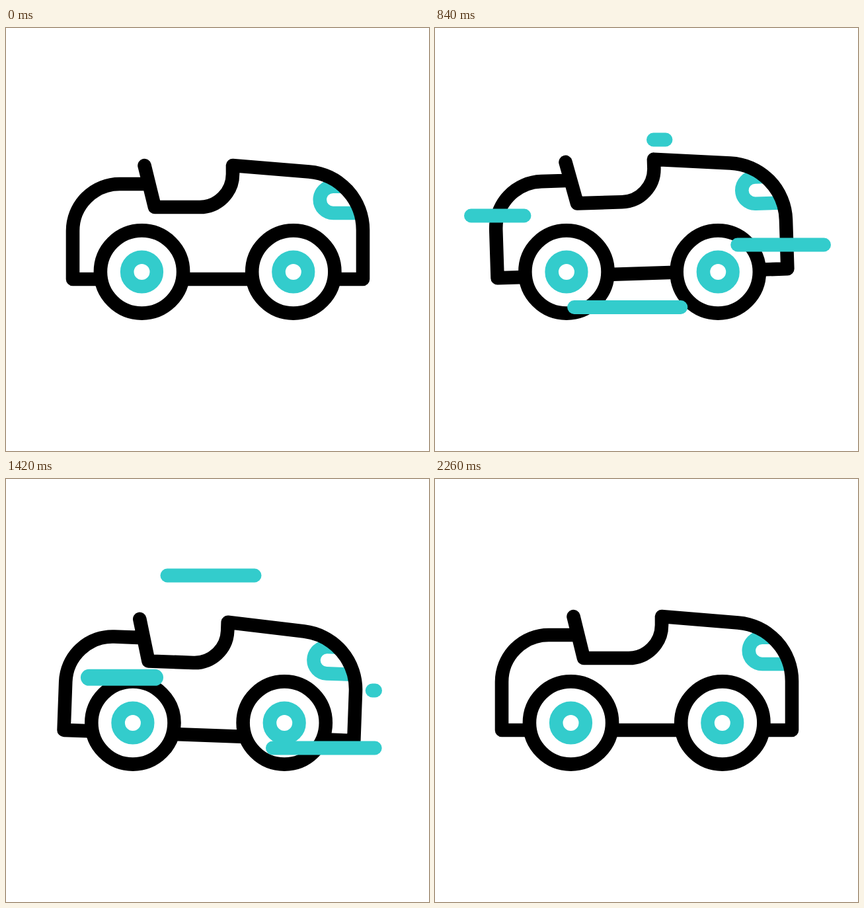
Recreate the animation shown at these times as an HTML page. Size 640 by 640 pixels, loop 3600 ms.

```html
<!DOCTYPE html>
<html lang="en">
<head>
<meta charset="utf-8">
<title>Bouncing car</title>
<style>
  html, body { margin: 0; width: 100%; height: 100%; overflow: hidden; background: #fff; }
  svg { display: block; width: 100%; height: 100%; }
  .ink { fill: none; stroke: #000; stroke-width: 20.6; stroke-linecap: round; stroke-linejoin: round; }
  .teal { fill: none; stroke: #33cccc; stroke-width: 20.6; }
  .wheel { fill: #fff; }
  #streaks { stroke: #33cccc; stroke-linecap: round; }
</style>
</head>
<body>
<svg viewBox="0 0 640 640">
  <defs>
    <g id="wheel">
      <circle class="ink wheel" r="62.6"/>
      <circle class="teal" r="22.3"/>
    </g>
  </defs>
  <g id="car">
    <g id="body">
      <path class="teal" d="M534 280H495a20.2 20.2 0 0 1 0-40.4H508"/>
      <path class="ink" d="M215 236H172A71 71 0 0 0 101 307V380H540V305.7A88.5 88.5 0 0 0 458.7 217.5L343 208V221A50 50 0 0 1 293 271H225L209.5 208"/>
    </g>
    <use href="#wheel" x="205.5" y="369"/>
    <use href="#wheel" x="434.8" y="369"/>
  </g>
  <g id="streaks"></g>
</svg>
<script>
const LOOP = 3600, REST = 2260;              // the car stands still after REST
const SPAN = 220;                            // full length of a streak
const GROW = 460, LAG = 300, SHRINK = 376;   // streak timing in ms

const clamp = x => Math.min(1, Math.max(0, x));
const ease = x => clamp(x) ** 2 * (3 - 2 * clamp(x));

// A value that swings from 0 through its turning points [time, value] and back to 0.
// Each turn adds one eased step, so no lookup is needed.
const swing = (...turns) => {
  const stops = [[0, 0], ...turns, [REST, 0]];
  return t => stops.slice(1).reduce((sum, [end, value], i) => {
    const [begin, from] = stops[i];
    return sum + (value - from) * ease((t - begin) / (end - begin));
  }, 0);
};

const shift = swing([565, -43.5], [1120, 31], [1620, -37.5]);
const lift = swing([290, 7.8], [940, -9.8], [1500, 8.9], [1760, -7.2]);
const tilt = swing([590, -2.65], [1580, 2.45]);

const car = document.getElementById('car');
const body = document.getElementById('body');
const group = document.getElementById('streaks');

// A bar that grows to the left from its right edge, then shrinks after its head.
function streak(start, right, y, width = 20.8) {
  const el = document.createElementNS('http://www.w3.org/2000/svg', 'path');
  el.setAttribute('stroke-width', width);
  group.append(el);
  const run = SPAN - width;
  const place = p => right - width / 2 - run * ease(p);
  return t => {
    const age = t - start;
    const shown = age >= 0 && age < LAG + SHRINK;
    const head = place(age / GROW), tail = place((age - LAG) / SHRINK);
    el.setAttribute('d', shown ? `M${head} ${y}H${tail}` : '');
  };
}

const streaks = [
  // first gust
  streak(236, 540, 169),
  streak(329, 264, 284),
  streak(474, 399, 422.5),
  streak(562, 599, 328),
  // second gust
  streak(1097, 571, 407),
  streak(1140, 386.5, 146),
  streak(1187, 238, 300.3, 25),
  streak(1380, 569, 320)
];

function draw(t) {
  car.setAttribute('transform', `translate(${shift(t)} 0)`);
  body.setAttribute('transform', `translate(0 ${lift(t)}) rotate(${tilt(t)} 320.5 380)`);
  streaks.forEach(move => move(t));
}

const begin = performance.now();
function tick() {
  draw((performance.now() - begin) % LOOP);
  requestAnimationFrame(tick);
}
tick();
</script>
</body>
</html>
```
